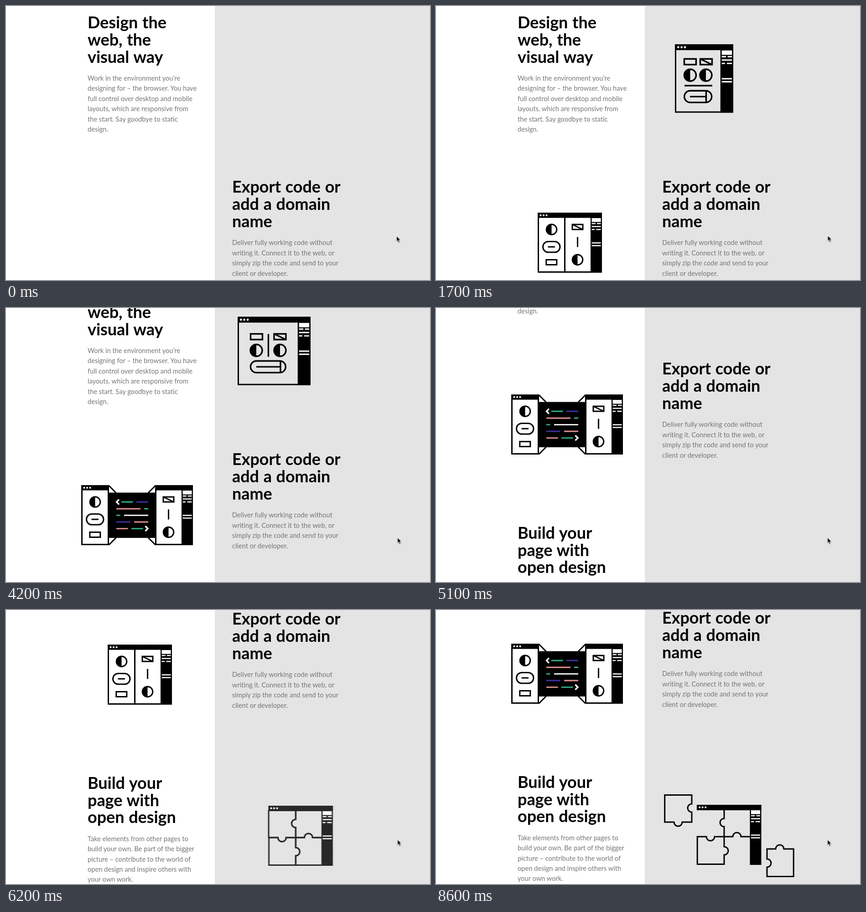
Animation of 930 by 602 pixels, one loop 8.8 s. Source, as an HTML page:

```html
<!DOCTYPE html>
<html lang="en">
<head>
<meta charset="utf-8">
<title>Visual web design</title>
<style>
@property --open { syntax: "<number>"; inherits: true; initial-value: 1; }

html, body { margin: 0; width: 100%; height: 100%; overflow: hidden; }
body { position: relative; background: linear-gradient(90deg, #fff 458px, #e4e4e4 458px); font-family: Lato, sans-serif; font-variant-ligatures: none; }

#page {
  position: absolute; left: 0; top: 0; width: 930px; height: 1000px;
  animation: scroll 8.8s linear infinite, open 8.8s ease-in-out infinite;
}
svg { position: absolute; left: 0; top: 0; overflow: visible; }

section { position: absolute; white-space: nowrap; }
h2 { margin: 0 0 17.7px; font-size: 36px; line-height: 37.7px; font-weight: 700; letter-spacing: -.05px; word-spacing: 1px; color: #050505; }
p { margin: 0; font-size: 14.6px; line-height: 22.45px; color: #757575; }

.line { fill: none; stroke: #000; stroke-width: 3; }
.bold { stroke-width: 3.4; }
.paper { fill: #fff; stroke: #000; stroke-width: 3; }
.code path { fill: none; stroke-width: 2.8; }

/* Parts sit at their closed position and travel by --x, --y as the window opens. */
.part { transform: translate(calc(var(--open) * var(--x, 0px)), calc(var(--open) * var(--y, 0px))); }
.grow { width: calc(var(--w) + var(--open) * var(--dw)); }
.divider { transform: translate(575.5px, calc(175px - 28px * var(--open))) rotate(calc(90deg * var(--open))) scaleX(calc(1 - .18 * var(--open))); }

.enter { animation: enter 8.8s linear infinite; }
.enter.late { animation-name: enter-late; }
#cursor { animation: cursor 8.8s linear infinite; filter: drop-shadow(0 1px 1px #0006); }

@keyframes open {
  0%, 13.64% { --open: 1; }
  17.05%, 36.36% { --open: 0; }
  40.91%, 65.34% { --open: 1; }
  69.32%, 89.77% { --open: 0; }
  94.32%, 100% { --open: 1; }
}
@keyframes scroll {
  0%, 44.32% { transform: translateY(0); }
  45.45% { transform: translateY(-10px); }
  47.73% { transform: translateY(-65px); }
  52.27% { transform: translateY(-158px); }
  57.95% { transform: translateY(-264px); }
  62.5% { transform: translateY(-330px); }
  67.05% { transform: translateY(-368px); }
  70.45% { transform: translateY(-378px); }
  73.86%, 100% { transform: translateY(-380px); }
}
@keyframes enter {
  0%, 6.59% { opacity: 0; transform: translateX(var(--from)); }
  11.59%, 100% { opacity: 1; transform: translateX(0); }
}
@keyframes enter-late {
  0%, 63.18% { opacity: 0; transform: translateX(20px); }
  64.77% { opacity: .45; transform: translateX(10px); }
  70.45% { opacity: .83; transform: translateX(3.4px); }
  72.16%, 100% { opacity: 1; transform: translateX(0); }
}
@keyframes cursor {
  0% { transform: translate(0, 0); }
  10.23% { transform: translate(-.5px, -1px); }
  17.05% { transform: translate(3px, -1px); }
  22%, 100% { transform: translate(2px, -1px); }
}
</style>
</head>
<body>
<div id="page">
  <section style="left:179px;top:17.2px">
    <h2>Design the<br>web, the<br>visual way</h2>
    <p>Work in the environment you’re<br>designing for – the browser. You have<br>full control over desktop and mobile<br>layouts, which are responsive from<br>the start. Say goodbye to static<br>design.</p>
  </section>
  <section style="left:496px;top:378.4px">
    <h2>Export code or<br>add a domain<br>name</h2>
    <p>Deliver fully working code without<br>writing it. Connect it to the web, or<br>simply zip the code and send to your<br>client or developer.</p>
  </section>
  <section style="left:179px;top:738.8px">
    <h2>Build your<br>page with<br>open design</h2>
    <p>Take elements from other pages to<br>build your own. Be part of the bigger<br>picture – contribute to the world of<br>open design and inspire others with<br>your own work.</p>
  </section>

  <svg width="930" height="1000">
    <defs>
      <g id="side">
        <path d="M0 0H25V132H0Z"/>
        <path fill="#fff" d="M2.5 12h20v8.5h-20z"/>
        <path stroke="#fff" stroke-width="2.6" d="M2.5 24h8.5m3 0h8.5M2.5 30.5h20M2.5 37h6.5m3.5 0h10M2.5 66.5h20M2.5 72.5h20"/>
      </g>
      <g id="dots" fill="#fff">
        <circle cx="6.5" cy="5.8" r="2.1"/><circle cx="13" cy="5.8" r="2.1"/><circle cx="19.5" cy="5.8" r="2.1"/>
      </g>
      <g id="moon">
        <circle class="line" r="11.3"/>
        <path d="M0-11A11 11 0 0 0 0 11Z"/>
      </g>
      <path id="box" class="line" d="M-11.5-5.5h23v11h-23z"/>
      <g id="crossed">
        <use href="#box"/>
        <path class="line" d="M-11.5-5.5l23 11"/>
      </g>
    </defs>

    <!-- Resizing layout -->
    <g class="enter" style="--from:20px">
      <rect class="part grow line" x="525.5" y="85.5" height="147.5" style="--x:-16px;--w:125px;--dw:32px"/>
      <rect class="part grow" x="524" y="84" height="13" style="--x:-16px;--w:128px;--dw:32px"/>
      <g class="part" style="--x:-16px"><use href="#dots" transform="translate(524 84) scale(1.13)"/></g>
      <g class="part" style="--x:16px"><use href="#side" transform="translate(623.8 84) scale(1.13 1.138)"/></g>
      <g class="part" style="--x:-8px;--y:5.5px"><use href="#box" transform="translate(557.5 122.5) scale(1.13)"/></g>
      <g class="part" style="--x:8.5px;--y:5.5px"><use href="#crossed" transform="translate(592.5 122.5) scale(1.13)"/></g>
      <g class="part" style="--x:-8.5px;--y:6px"><use href="#moon" transform="translate(557.5 152) scale(1.15)"/></g>
      <g class="part" style="--x:9px;--y:6px"><use href="#moon" transform="translate(592 152) scale(1.15)"/></g>
      <rect class="divider" x="-30.5" y="-1.7" width="61" height="3.4"/>
      <rect class="part grow line bold" x="544.7" y="186.3" height="25.6" rx="12.8" style="--x:-8.3px;--y:-5px;--w:60px;--dw:17px"/>
      <rect class="part grow" x="557" y="197.5" height="3.2" style="--x:-8px;--y:-5px;--w:35px;--dw:18px"/>
      <path class="part line bold" d="M592.5 187v24" style="--x:9.5px;--y:-5px"/>
    </g>

    <!-- Window parting over code -->
    <g class="enter" style="--from:-20px">
      <path d="M226 470.5h102v99.5h-102z"/>
      <g class="code">
        <path stroke="#fff" style="stroke-width:3.4" d="M248 485.5l-5.5 5.5 5.5 5.5M305.5 544l5.5 5.5-5.5 5.5"/>
        <path stroke="#2fb58c" d="M253 491h25.5M303 506h9M242 520.3h8.5M275 549.6h25.5"/>
        <path stroke="#3e31a6" d="M286 491h26M242 535h30.5"/>
        <path stroke="#e79490" d="M242 506h53M281 535h31M242 549.6h25.5"/>
        <path stroke="#fff" d="M259 520.3h53"/>
      </g>
      <path class="part line" d="M283 455l16 16M283 585.5l16-16" style="--x:-57.5px"/>
      <path class="part line" d="M282 455l-16 16M282 585.5l-16-16" style="--x:46px"/>
      <g class="part" style="--x:46px">
        <path class="paper" d="M282.5 455.5H362.5V584.5H282.5Z"/>
        <path d="M281 454h83v11.5h-83z"/>
        <use href="#side" x="339" y="454"/>
        <use href="#crossed" x="310.5" y="485.5"/>
        <path class="line" d="M310.5 507.5v22"/>
        <use href="#moon" x="310.5" y="557.5"/>
      </g>
      <g class="part" style="--x:-58px">
        <path class="paper" d="M224.5 455.5H282.5V584.5H224.5Z"/>
        <path d="M223 454h61v11.5h-61z"/>
        <use href="#dots" x="223" y="454"/>
        <use href="#moon" x="253.5" y="491"/>
        <rect class="line" x="234.5" y="517.5" width="37.5" height="23.5" rx="11.7"/>
        <path class="line" d="M245.5 529.2h15.5"/>
        <use href="#box" x="253.3" y="563"/>
      </g>
    </g>

    <!-- Jigsaw page -->
    <g transform="translate(0 380)">
      <g class="enter late">
        <path class="line" d="M632 440V458a9 9 0 0 0 0 18V498H651a9 9 0 0 1 18 0H690"/>
        <path class="line" d="M573.2 498H593a9 9 0 0 0 18 0H632V520a9 9 0 0 1 0 18V558.5H573.2Z"/>
        <path class="part line" d="M572.7 438.5H632V458a9 9 0 0 0 0 18V498H611a9 9 0 0 1-18 0H572.7Z" style="--x:-71px;--y:-32px"/>
        <path class="part line" d="M632 498H651a9 9 0 0 1 18 0H690.3V558.5H632V538a9 9 0 0 0 0-18Z" style="--x:94px;--y:27px"/>
        <path d="M572 428h141.5v12h-141.5z"/>
        <use href="#dots" x="571.7" y="427.8"/>
        <use href="#side" x="688.5" y="428"/>
      </g>
    </g>
  </svg>
</div>

<svg width="930" height="602">
  <path id="cursor" d="M857 506v11l2.5-2.3 1.9 4.2 1.9-.8-1.8-4.1h3.4z" stroke="#fff" stroke-width=".7"/>
</svg>

<script>
// The picture advances ten times a second.
const LOOP = 8800, STEP = 100;
const start = performance.now();

function tick() {
  const time = Math.floor((performance.now() - start) / STEP) * STEP % LOOP;
  for (const animation of document.getAnimations()) {
    animation.pause();
    animation.currentTime = time;
  }
  requestAnimationFrame(tick);
}
tick();
</script>
</body>
</html>
```
